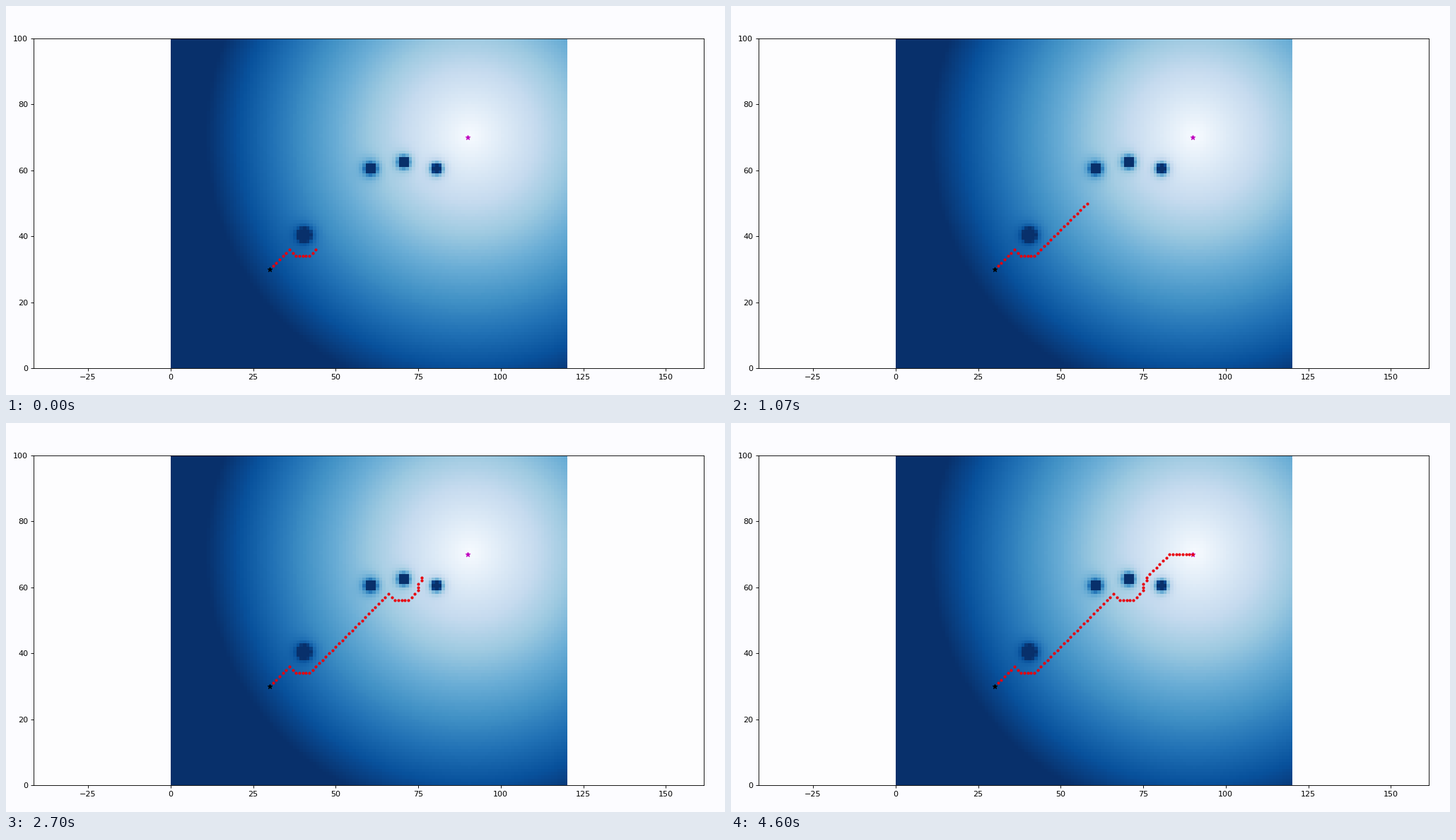
A matplotlib script for the animation above (4630 ms loop, 1017 by 551 pixels).

```python
import numpy as np
import matplotlib.pyplot as plt
from matplotlib.animation import FuncAnimation

WIDTH, HEIGHT, DPI = 1017, 551, 80
LEFT, RIGHT, BOTTOM, TOP = 39, 987, 38, 505  # axes edges in pixels
LOOP_MS, FRAMES = 4630, 210
INTERVAL = LOOP_MS / FRAMES

COLUMNS, ROWS = 120, 100
START, GOAL = (30, 30), (90, 70)
OBSTACLES = [(40, 40), (60, 60), (70, 62), (80, 60)]
ATTRACTION, REPULSION, REACH = 2.5, 400, 10

MOVES_AT_START = 14.93
MS_PER_MOVE = 78.9


def potential_field():
    x, y = np.meshgrid(np.arange(COLUMNS), np.arange(ROWS))
    pull = ATTRACTION / 2 * np.hypot(x - GOAL[0], y - GOAL[1])
    nearest = np.min([np.hypot(x - ox, y - oy) for ox, oy in OBSTACLES], axis=0)
    nearest = np.clip(nearest, 0.1, REACH)
    return pull + REPULSION / 2 * (1 / nearest - 1 / REACH) ** 2


def steepest_descent(field):
    """Step to the lowest neighbouring cell until a minimum is reached."""
    x, y = START
    path = []
    while True:
        around = field[y - 1:y + 2, x - 1:x + 2]
        dy, dx = np.unravel_index(around.argmin(), around.shape)
        if (dx, dy) == (1, 1):
            return np.array(path)
        x, y = x + dx - 1, y + dy - 1
        path.append((x, y))


field = potential_field()
path = steepest_descent(field)

fig = plt.figure(figsize=(WIDTH / DPI, HEIGHT / DPI), dpi=DPI, facecolor="#fcfcff")
ax = fig.add_axes([LEFT / WIDTH, BOTTOM / HEIGHT,
                   (RIGHT - LEFT) / WIDTH, (TOP - BOTTOM) / HEIGHT],
                  facecolor="#fdfdfe")
ax.imshow(field, cmap="Blues", vmin=0, vmax=100, origin="lower",
          extent=(0, COLUMNS, 0, ROWS), interpolation="nearest", aspect="auto")
ax.set(xlim=(-41.5, 161.5), ylim=(0, ROWS),
       xticks=range(-25, 151, 25), yticks=range(0, 101, 20))
ax.plot(*START, "*k")
ax.plot(*GOAL, "*m")
trail, = ax.plot([], [], ".", color="#e8000c", markersize=5.5)


def update(frame):
    count = int(MOVES_AT_START + frame * INTERVAL / MS_PER_MOVE)
    trail.set_data(path[:count, 0], path[:count, 1])
    return trail,


anim = FuncAnimation(fig, update, frames=FRAMES, interval=INTERVAL,
                     repeat=True, repeat_delay=0)
plt.show()
```
